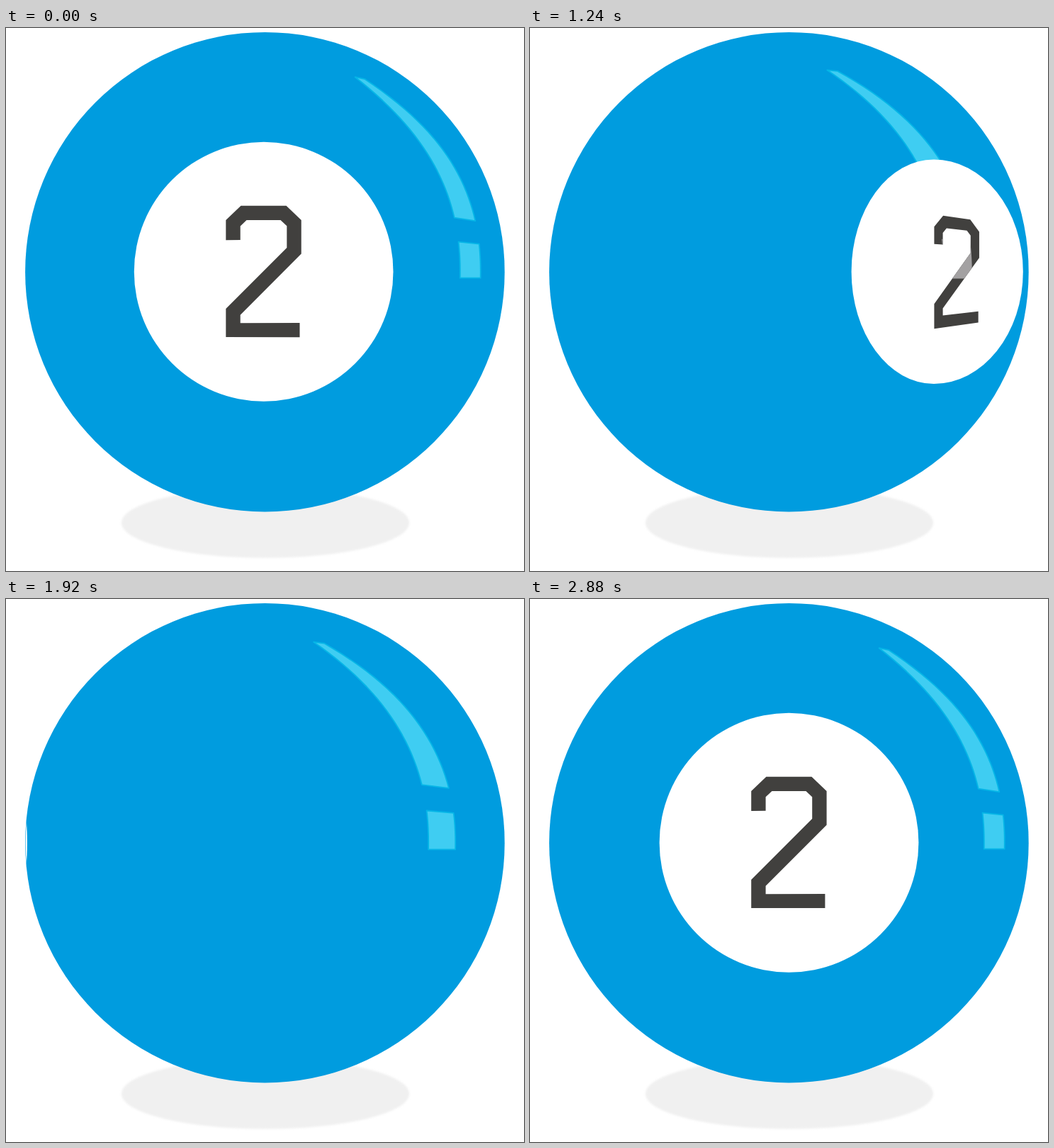
Recreate the animation shown at these times as an HTML page with a canvas. Size 731x766 px, loop 2920 ms.

```html
<!DOCTYPE html>
<html lang="en">
<head>
<meta charset="utf-8">
<title>Rolling ball</title>
<style>
html, body { margin: 0; width: 100%; height: 100%; overflow: hidden; background: #fff; }
canvas { display: block; }
</style>
</head>
<body>
<canvas id="stage" width="731" height="766"></canvas>
<script>
const ctx = document.getElementById('stage').getContext('2d');
const LOOP = 2920, STEP = 40;
const R = 338.3, CX = 365.4, CY = 343.7;
const SPOT = 183; // radius of the white spot seen from the front
const CAP = 32.7; // the same as an angle on the ball
const COLORS = {
  ball: '#009cdf', shine: '#3fcdf2', shineEdge: '#06b6e7',
  digit: '#41403e', glare: '#a3a1a2', shadow: '#f0f0f0'
};

const sin = deg => Math.sin(deg * Math.PI / 180);
const cos = deg => Math.cos(deg * Math.PI / 180);
const squash = x => 1 - 0.37 * (x / R) ** 2; // height shrinks towards the rim
const ease = p => p < 0.5 ? 4 * p ** 3 : 1 - 4 * (1 - p) ** 3;

function polygon(points) {
  const path = new Path2D();
  points.forEach(([x, y]) => path.lineTo(CX + x, CY + y));
  path.closePath();
  return path;
}

// Outline of a polyline drawn as a thick line with mitred corners
function thicken(line, half) {
  const normal = (a, b) => {
    const dx = b[0] - a[0], dy = b[1] - a[1], d = Math.hypot(dx, dy);
    return [-dy / d, dx / d];
  };
  const side = sign => line.map((p, i) => {
    const a = normal(line[Math.max(i - 1, 0)], line[Math.max(i, 1)]);
    const last = line.length - 1;
    const b = normal(line[Math.min(i, last - 1)], line[Math.min(i + 1, last)]);
    const k = sign * half / (1 + a[0] * b[0] + a[1] * b[1]);
    return [p[0] + k * (a[0] + b[0]), p[1] + k * (a[1] + b[1])];
  });
  return [...side(1), ...side(-1).reverse()];
}

const DIGIT = thicken([
  [-43, -45], [-43, -69], [-28, -83], [28, -83], [43, -69],
  [43, -29.5], [-43, 57], [-43, 83], [51, 83]
], 10.2);

// Longitudes of the highlight's two edges at a height above the equator
const innerEdge = y => 54.5 - 1.3e-4 * Math.abs(y) ** 2.2;
const outerEdge = y => 64.1 - 2.16e-4 * Math.abs(y) ** 2.15;

function onBall(lon, y, turn) {
  const ring = R - 4e-4 * y * y;
  const x = ring * sin(lon - turn);
  const lift = (squash(x) / squash(ring * sin(lon))) ** 0.8;
  return [x, -y * lift];
}

function shineBand(top, bottom, slant, turn) {
  const edge = (lon, from, to) => Array.from({ length: 25 }, (_, i) => {
    const y = from + (to - from) * i / 24;
    return onBall(lon(y), y, turn);
  });
  return polygon([
    ...edge(innerEdge, top, bottom),
    ...edge(outerEdge, bottom - slant, top - 3)
  ]);
}

function shinePath(t) {
  const turn = 14.4 * (1 - ease(Math.min(Math.abs(t - 1395) / 1420, 1)));
  const path = shineBand(274.5, 76, 4.5, turn);
  path.addPath(shineBand(42, -9, 0, turn));
  return path;
}

function ballPath(inset) {
  const path = new Path2D();
  path.arc(CX, CY + 0.5, R - inset, 0, 7);
  return path;
}

// Spot as two half ellipses, the outer one running past the rim when turned away
function spotPath(turn, side) {
  const tilt = 0.96 * turn;
  const inner = R * sin(tilt - CAP);
  const near = Math.max(276 * sin(tilt) - inner, 25);
  const far = SPOT - 104 * sin(tilt) ** 2;
  const mid = inner + near;
  const high = SPOT * squash(mid);
  const x = CX + side * mid;
  const [left, right] = side > 0 ? [near, far] : [far, near];
  const path = new Path2D();
  path.ellipse(x, CY, right, high, 0, -Math.PI / 2, Math.PI / 2);
  path.ellipse(x, CY, left, high, 0, Math.PI / 2, Math.PI * 1.5);
  return path;
}

function digitPath(turn, side) {
  const s = sin(turn);
  const width = 1 - 0.69 * s ** 2 - 0.31 * s ** 30;
  return polygon(DIGIT.map(([u, v]) => {
    const x = side * 310 * s + u * width;
    return [x, v * squash(x)];
  }));
}

function fill(path, color) {
  ctx.fillStyle = color;
  ctx.fill(path);
}

function draw(t) {
  ctx.fillStyle = '#fff';
  ctx.fillRect(0, 0, 731, 766);

  const shadow = new Path2D();
  shadow.ellipse(366, 698, 203, 49.5, 0, 0, 7);
  ctx.filter = 'blur(1.5px)';
  fill(shadow, COLORS.shadow);
  ctx.filter = 'none';

  fill(ballPath(0), COLORS.ball);

  const shine = shinePath(t);
  fill(shine, COLORS.shine);
  ctx.strokeStyle = COLORS.shineEdge;
  ctx.lineWidth = 1.8;
  ctx.lineJoin = 'round';
  ctx.stroke(shine);

  // Two turns per loop, the spot travelling right to left
  const angle = 0.35 + t * (719.65 / 2880);
  const turned = (angle + 180) % 360 - 180;
  const turn = Math.abs(turned), side = turned > 0 ? -1 : 1;
  if (turn > 127) return;

  ctx.save();
  ctx.clip(ballPath(0.5));
  fill(spotPath(turn, side), '#fff');
  if (turn < 90) {
    const digit = digitPath(turn, side);
    fill(digit, COLORS.digit);
    ctx.clip(digit);
    fill(shine, COLORS.glare);
  }
  ctx.restore();
}

const start = performance.now();
function tick() {
  const t = (performance.now() - start) % LOOP;
  draw(Math.floor(t / STEP) * STEP);
  requestAnimationFrame(tick);
}
tick();
</script>
</body>
</html>
```
